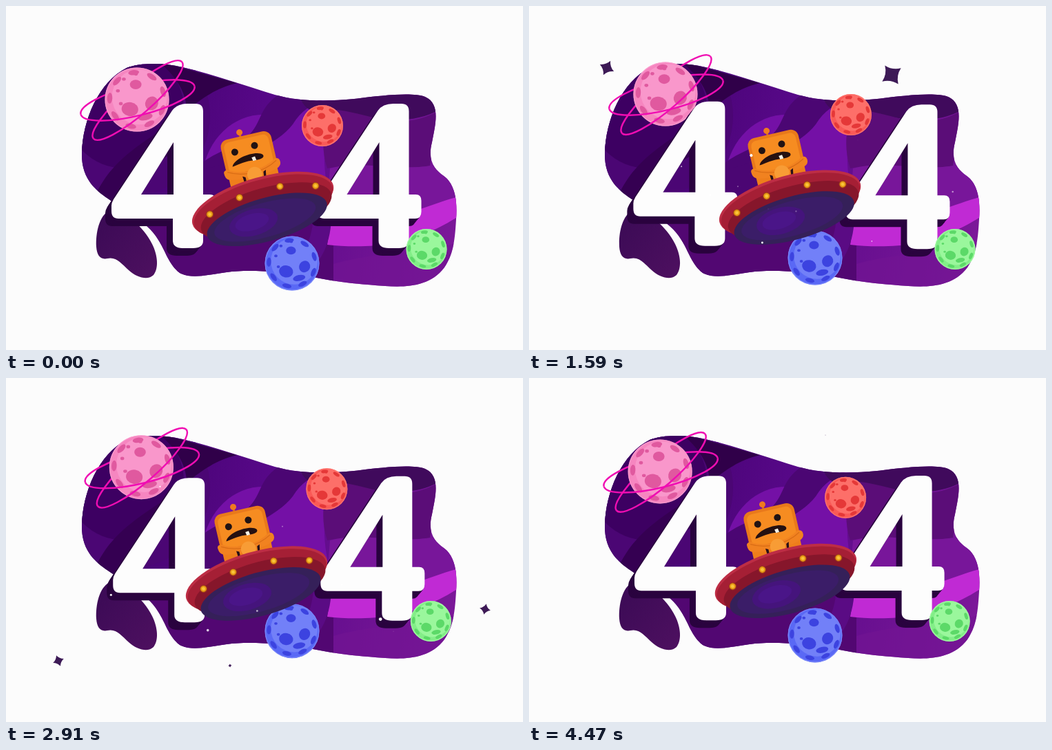
Animation, 750 px wide and 500 px high, one loop 4.5 s. Source, as an HTML page:

```html
<!DOCTYPE html>
<html lang="en">
<head>
<meta charset="utf-8">
<title>404</title>
<style>
html, body { margin: 0; width: 100%; height: 100%; overflow: hidden; background: #fcfcfc; }
svg { display: block; width: 100vw; height: 100vh; }
</style>
</head>
<body>
<svg viewBox="0 0 750 500" xmlns="http://www.w3.org/2000/svg">
  <defs>
    <linearGradient id="space" gradientUnits="userSpaceOnUse" x1="110" y1="200" x2="655" y2="330">
      <stop offset="0" stop-color="#40006a"/>
      <stop offset=".45" stop-color="#570888"/>
      <stop offset="1" stop-color="#7c1899"/>
    </linearGradient>
    <linearGradient id="lobe" x1="0" y1="0" x2="1" y2="1">
      <stop offset="0" stop-color="#3a0a55"/>
      <stop offset="1" stop-color="#4e1060"/>
    </linearGradient>
    <linearGradient id="beam" x1="0" y1="1" x2="1" y2="0">
      <stop offset="0" stop-color="#b79ad0" stop-opacity=".5"/>
      <stop offset="1" stop-color="#f2eaff"/>
    </linearGradient>
    <clipPath id="blob"><path d="M110 215C111 165 135 110 175 90C195 82 230 82 260 90C300 99 350 117 390 129C425 139 465 139 505 135C545 130 590 125 608 132C631 142 623 172 618 198C611 225 622 238 635 247C652 259 655 285 653 310C651 345 648 362 636 380C615 408 580 409 550 407C500 404 470 399 440 393C390 385 350 383 320 387C290 391 270 397 252 388C236 376 231 355 221 340C212 325 200 315 180 302C150 280 130 272 118 250C111 237 110 225 110 215Z"/></clipPath>
    <path id="four" fill-rule="evenodd" d="M263 142H275Q286 142 286 153V274H296Q304 274 304 283V299Q304 309 295 309H286V341Q286 352 271 352H257Q242 352 242 341V309H163Q153 309 153 298V290Q153 286 156 281L241 152Q248 142 263 142ZM243 198V274H196Z"/>
    <g id="digit">
      <g id="shade" fill="#2a033f"></g>
      <use href="#four" fill="#fdfdfd"/>
    </g>
  </defs>

  <g clip-path="url(#blob)">
    <rect x="100" y="70" width="570" height="350" fill="url(#space)"/>
    <path d="M180 300H475V400H200Z" fill="#520772"/>
    <circle cx="180" cy="160" r="116" fill="#4b0674"/>
    <circle cx="172" cy="150" r="86" fill="#3d0062"/>
    <path d="M125 285C150 225 190 205 240 170L262 200C220 230 180 240 160 300Z" fill="#350052"/>
    <path d="M220 80L335 112C305 119 285 134 262 152C262 125 245 100 220 80Z" fill="#300049"/>
    <path d="M284 245C294 185 340 148 395 160C430 150 440 145 455 136L480 137C455 195 458 240 475 300L360 290C330 250 305 245 284 250Z" fill="#7410a6"/>
    <path d="M284 243C335 228 395 200 416 172C428 152 445 142 460 137L395 129C365 150 372 170 350 190C330 206 305 212 284 228Z" fill="#4b0673"/>
    <path d="M284 238C310 232 330 225 345 216V290H284Z" fill="#4b0673"/>
    <path d="M428 136C440 168 490 152 530 162C560 168 600 168 630 150V115H428Z" fill="#400a5c"/>
    <path d="M470 150C500 152 520 160 545 165C575 170 600 168 628 152L615 232C570 240 530 225 466 236C456 205 460 175 470 150Z" fill="#5b0d78"/>
    <path d="M470 236C520 222 570 245 640 228L660 280C600 300 540 320 465 300Z" fill="#78169a"/>
    <path d="M653 278C610 290 570 310 520 317C500 320 485 320 470 320L466 347C510 352 570 350 610 330C630 322 645 313 656 306Z" fill="#c02ad4"/>
    <path d="M446 310H472C470 350 455 375 430 395L400 390C430 370 442 345 446 310Z" fill="#5a0b84"/>
    <path d="M475 375C540 355 600 365 650 345V415H475Z" fill="#731493" opacity=".7"/>
  </g>
  <path d="M150 297C135 305 130 330 131 350C132 363 137 369 147 367C160 364 167 374 178 384C190 395 206 399 214 391C222 381 220 362 212 346C205 332 196 322 185 312C172 300 160 292 150 297Z" fill="url(#lobe)"/>
  <g id="meteors" fill="url(#beam)"></g>

  <g id="pink"></g>
  <g id="red"></g>
  <g id="blue"></g>
  <use id="left" href="#digit"/>
  <use id="right" href="#digit"/>
  <g id="green"></g>

  <g id="ship">
    <g transform="translate(352 215) rotate(-13)">
      <path d="M-6 -27V-33" stroke="#d96a1c" stroke-width="3"/>
      <circle cx="-6" cy="-33.5" r="4.5" fill="#f07a20"/>
      <rect x="-36" y="15" width="72" height="50" rx="6" fill="#ee7e1b"/>
      <rect x="-37.5" y="-27.5" width="75" height="56" rx="11" fill="#e9791b"/>
      <rect x="-33" y="-23" width="66" height="47" rx="8" fill="#f68c21"/>
      <path d="M-41 23Q-43 15 -35 16C-15 28 15 28 35 15Q43 14 42 23Q41 29 30 31C15 35 -15 35 -30 32Q-40 31 -41 23Z" fill="#f18220"/>
      <path d="M-36 19C-15 31 15 31 37 18" fill="none" stroke="#d96d15" stroke-width="1.2"/>
      <circle cx="2" cy="31" r="11" fill="#f89c35"/>
      <path d="M-16 30L-12 32V42H-15ZM15 30L19 28L17 40L14 41Z" fill="#291019"/>
      <circle cx="-19" cy="-7" r="5" fill="#211313"/>
      <circle cx="11" cy="-10" r="5" fill="#211313"/>
      <path d="M-27 13C-22 0 14 -3 20 6C22 11 14 12 6 11C-6 9 -18 12 -27 13Z" fill="#251111"/>
      <path d="M3 6L8 5.5L9 11L4 11.5Z" fill="#f4f1e6"/>
    </g>
    <g transform="translate(373 290) rotate(-15.6)">
      <ellipse cy="-1.5" rx="106" ry="40" fill="#bd2d45"/>
      <ellipse cy="1" rx="104" ry="38.5" fill="#a51f35"/>
      <ellipse cx="2" cy="10" rx="98" ry="35" fill="#86162b"/>
      <ellipse cy="21" rx="90" ry="31.5" fill="#352059"/>
      <ellipse cx="-3" cy="21" rx="76" ry="25" fill="#3b1d68"/>
      <ellipse cx="-20" cy="20" rx="36" ry="19" fill="#45147c"/>
      <ellipse cx="-22" cy="19" rx="25" ry="12" fill="#4a1588"/>
      <g id="lamps"></g>
    </g>
  </g>
  <g id="dots" fill="#fff"></g>
  <g id="sparks" fill="#3d1a56"></g>
</svg>
<script>
const LOOP = 4500;
const $ = id => document.getElementById(id);
const add = (parent, tag, attrs) => {
  const el = document.createElementNS('http://www.w3.org/2000/svg', tag);
  for (const k in attrs) el.setAttribute(k, attrs[k]);
  return parent.appendChild(el);
};
const move = (el, x, y, more = '') => el.setAttribute('transform', `translate(${x} ${y})${more}`);

// Rises from 0 to 1 at the top moment, then falls back
const ramp = (t, from, top, to) => Math.max(0, t < top ? (t - from) / (top - from) : (to - t) / (to - top));

// Straight moves through [time, x, y], from rest and back to rest
function path(keys, t) {
  const rows = [[0, 0, 0], ...keys, [LOOP, 0, 0]];
  const i = rows.findIndex(r => r[0] > t);
  const [t0, x0, y0] = rows[i - 1], [t1, x1, y1] = rows[i];
  const k = (t - t0) / (t1 - t0);
  return [x0 + (x1 - x0) * k, y0 + (y1 - y0) * k];
}

let seed = 7;
const rand = (lo, hi) => lo + (hi - lo) * ((seed = seed * 16807 % 2147483647) / 2147483647);

// Extruded side of the digits
for (let i = 10; i > 0; i--) add($('shade'), 'use', { href: '#four', x: -0.9 * i, y: 1.1 * i });

function planet(id, x, y, r, dx, dy, [base, light, pit], rings = []) {
  const el = $(id);
  const arc = ([ry, turn], sweep) => add(el, 'path', {
    d: `M-85 0A85 ${ry} 0 0 ${sweep} 85 0`, transform: `translate(1 1) rotate(${turn})`,
    fill: 'none', stroke: '#f00db2', 'stroke-width': 2.5
  });
  const crater = (cx, cy, rx, ry, turn = 0) => add(el, 'ellipse', {
    rx: rx * r, ry: ry * r, fill: pit, transform: `translate(${cx * r} ${cy * r}) rotate(${turn})`
  });
  rings.forEach(q => arc(q, 1));
  add(el, 'circle', { r, fill: base });
  add(el, 'circle', { r: r * .86, cx: r * .08, cy: -r * .08, fill: light, opacity: .6 });
  crater(-.04, -.47, .18, .15);
  crater(-.22, .3, .26, .22, 10);
  crater(.46, .12, .2, .22, 30);
  crater(.26, .54, .23, .11, -12);
  for (let a = -97; a < 263; a += 40) {
    const c = Math.cos(a * Math.PI / 180), s = Math.sin(a * Math.PI / 180);
    crater(.85 * c, .85 * s, .08, .17, a);
    if (s < 0) crater(.6 * s, .6 * c - .2, .06, .05);
  }
  add(el, 'circle', { r: r - .6, fill: 'none', stroke: light, 'stroke-width': 1.2, opacity: .8 });
  rings.forEach(q => arc(q, 0));
  return t => {
    const k = ramp(t, 0, 2000, LOOP);
    move(el, x + dx * k, y + dy * k);
  };
}

const planets = [
  planet('pink', 190, 136, 46.5, 10, -10, ['#f686c0', '#fca4d2', '#e0599f'], [[22, -14], [20, -41]]),
  planet('red', 459, 174, 30, 10, -20, ['#fa5a57', '#ff7d76', '#e53838']),
  planet('blue', 415, 374, 39.5, 0, -10, ['#5a69f5', '#8290fb', '#3c43e0']),
  planet('green', 610, 353.5, 29.5, 10, 0, ['#83ee88', '#abfdaa', '#5cd968'])
];

// Lamps sit along the upper rim
for (const cx of [-78, -30, 31, 81]) {
  const cy = 12 - 34 * Math.sqrt(1 - (cx / 98) ** 2);
  [[5.6, '#9c3a1c'], [4.4, '#e89a15'], [2.4, '#f8c53a']]
    .forEach(([r, fill]) => add($('lamps'), 'circle', { cx, cy, r, fill }));
}

const dots = Array.from({ length: 64 }, () => ({
  el: add($('dots'), 'circle', { cx: rand(140, 630), cy: rand(140, 370) }),
  r: rand(1, 2.5), peak: rand(450, 4050), half: rand(250, 420)
}));

// Four-pointed sparkles: x, y, peak time, radius
const sparks = [
  [98, 368, 800, 9], [526, 100, 1540, 18], [113, 90, 1850, 18], [76, 411, 2700, 12],
  [430, 83, 3800, 13], [325, 418, 3500, 16], [695, 336, 3330, 20]
].map(s => [add($('sparks'), 'path', { d: 'M0-1Q.28-.28 1 0Q.28.28 0 1Q-.28.28-1 0Q-.28-.28 0-1Z' }), ...s]);

// Shooting stars: x, y, dx, dy, start, end
const meteors = [
  [178, 355, 53, -37, 270, 570],
  [374, 217, 26, -27, 1880, 2080]
].map(m => [add($('meteors'), 'path', {}), ...m]);

function draw(t) {
  planets.forEach(set => set(t));
  move($('left'), ...path([[1500, -2.4, -3.6], [2460, 5.7, -.5], [3330, -1, 6.6]], t));
  const [rx, ry] = path([[1700, 8.5, 1.4]], t);
  move($('right'), 298.5 + rx, ry);
  move($('ship'), ...path([[1500, 7.2, -2.7], [2785, -9.8, 4]], t));

  for (const { el, r, peak, half } of dots) {
    const k = ramp(t, peak - half, peak, peak + half);
    el.setAttribute('r', r * Math.sqrt(k));
    el.setAttribute('opacity', Math.min(1, k * 1.5));
  }
  for (const [el, x, y, peak, r] of sparks) {
    const k = r * ramp(t, peak - 700, peak, peak + 700);
    move(el, x, y, ` rotate(${50 + (t - peak) * .09}) scale(${k})`);
  }
  for (const [el, x, y, dx, dy, from, to] of meteors) {
    const k = (t - from) / (to - from);
    const live = k > 0 && k < 1;
    el.style.display = live ? '' : 'none';
    if (!live) continue;
    const tail = Math.max(0, k * 2 - 1), head = Math.min(1, k * 2);
    const len = Math.hypot(dx, dy), nx = -dy / len * 1.1, ny = dx / len * 1.1;
    const hx = x + dx * head, hy = y + dy * head;
    el.setAttribute('d', `M${x + dx * tail} ${y + dy * tail}L${hx + nx} ${hy + ny}L${hx - nx} ${hy - ny}Z`);
  }
}

function frame(now) {
  draw(now % LOOP);
  requestAnimationFrame(frame);
}
draw(0);
requestAnimationFrame(frame);
</script>
</body>
</html>
```
